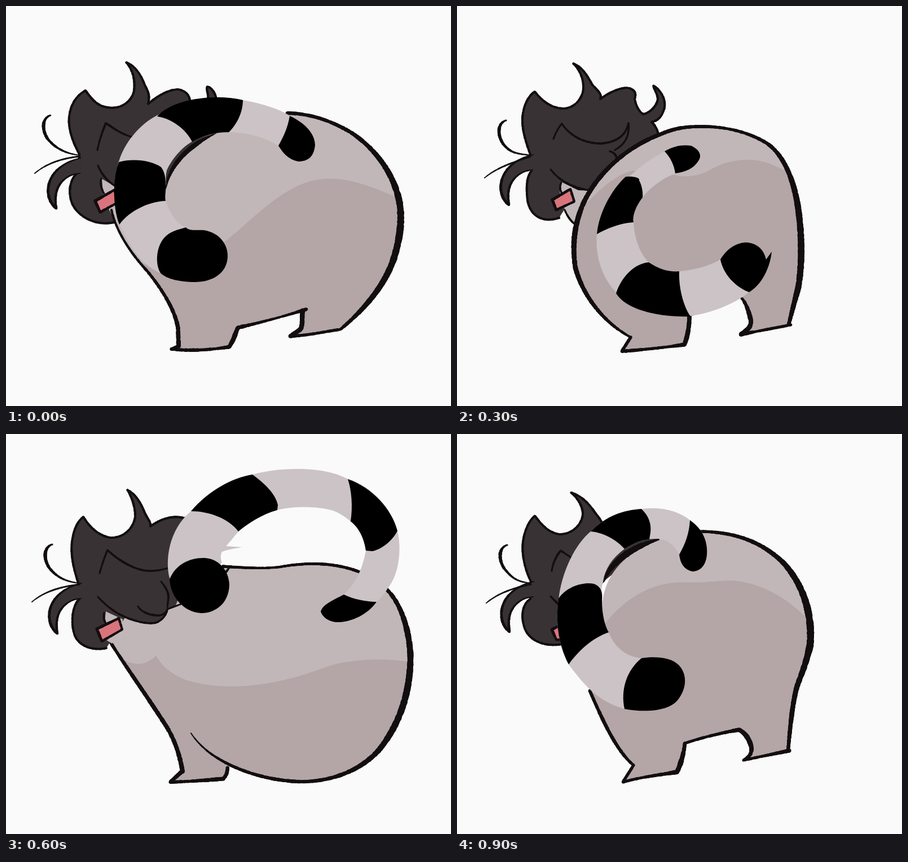
An HTML page with a canvas for the animation above (1 s loop, 789x710 px).

```html
<!DOCTYPE html>
<html lang="en">
<head>
<meta charset="utf-8">
<title>Tail swing</title>
<style>
html, body { margin: 0; width: 100%; height: 100%; overflow: hidden; background: #fafafa; }
canvas { display: block; }
</style>
</head>
<body>
<canvas id="stage" width="789" height="710"></canvas>
<script>
const W = 789, H = 710, STEP = 100;
const INK = '#130f11', HAIR = '#383234', LIGHT = '#c2b7b8', DARK = '#b4a6a6',
      TAIL = '#cbc3c6', PINK = '#d9747c', PAPER = '#fafafa';

// hair: paths ending in Z are filled only. ink: [path, widths along it].
const poses = [
  {
    wisps: [79, 194, 51, 297], lock: [-2, 4],
    hair: [
      'M192,384C160,391 128,375 117,350C108,325 116,303 130,293L130,263C118,240 108,215 113,190C117,170 128,157 141,150C150,162 160,178 181,180C205,184 224,168 227,150C229,132 226,115 213,100C232,108 240,125 246,140C251,150 256,158 252,174C270,158 290,148 305,148C318,150 325,158 326,168',
      'M326,168L375,230L290,330L192,384L130,300L252,174Z',
      'M357,168C361,158 354,150 357,143C367,146 371,156 374,168'
    ],
    skin: 'M170,307L197,322L202,400L182,360L172,332Z',
    tag: 'M158,346L193,326L196,350L167,366Z',
    strands: [
      'M162,256C165,240 170,225 177,208C190,216 205,229 230,234',
      'M163,283C170,300 180,311 197,322',
      'M169,306C166,316 170,326 174,333'
    ],
    body: 'M187,362C195,400 222,440 250,470C277,503 300,540 305,572L306,603L293,609C330,613 365,610 396,605L403,592L411,571C450,562 490,552 530,539C524,552 527,565 522,574L504,586C535,585 565,578 593,574C624,548 668,505 686,450C702,400 702,360 692,330C680,290 650,250 610,224C575,203 540,191 498,190C450,190 400,205 358,230C322,250 297,280 284,323Z',
    shade: 'M230,447C255,470 300,480 388,418C425,390 470,340 520,318C570,297 620,303 720,353V640H230Z',
    ink: [
      ['M187,362C195,400 222,440 250,470C277,503 300,540 305,572L306,604', [4, 4, 5, 6, 8]],
      ['M306,603L293,609C330,613 365,610 396,605L403,592L411,571C450,562 490,552 533,538', [5, 6, 5, 8, 5, 4, 6]],
      ['M526,541C524,552 527,565 522,574L504,586C535,585 565,578 593,574', [8, 8, 5, 5, 5]],
      ['M593,574C624,548 668,505 687,450C703,400 703,360 693,330C681,290 651,250 611,224C575,203 540,191 498,190', [5, 9, 11, 12, 10, 7, 6, 6]],
      ['M283,323C290,285 318,250 372,226', [3, 7, 8, 2]]
    ],
    tail: 'M274,474C240,460 222,430 201,388C190,350 190,300 201,273C210,245 235,210 270,193C310,165 370,158 420,167C455,173 490,185 503,195C530,208 548,228 548,250C546,270 530,277 518,276C500,274 492,262 483,248C455,230 420,224 395,224C375,224 355,228 331,240C305,255 290,280 285,292C283,300 283,310 284,318C282,330 281,340 284,347C290,370 305,388 319,393Z',
    bands: [
      'M268,196C295,165 370,155 420,167C420,190 408,212 395,224C370,224 350,230 330,241C320,220 295,200 268,196Z',
      'M200,277C225,270 258,274 275,286C284,298 282,310 284,320C282,335 282,342 283,346C255,347 220,362 201,388C188,355 190,300 200,277Z',
      'M503,195C535,210 548,230 548,247C546,268 535,276 518,276C500,272 492,262 483,248C492,232 500,215 503,195Z',
      'M319,393C325,400 340,397 352,398C380,403 394,425 393,445C392,475 365,490 335,490C310,490 285,485 274,474C265,460 265,430 280,412C290,400 305,397 319,393Z'
    ]
  },
  {
    front: true, wisps: [82, 196, 46, 298], lock: [0, -1],
    hair: [
      'M178,380C150,386 127,374 121,355C115,335 117,305 130,293L128,264C120,240 113,210 118,185C121,168 127,155 137,147C147,163 162,180 185,184C210,185 228,165 229,145C229,128 222,110 215,99C232,108 240,125 246,140C251,150 258,158 256,164C275,150 298,143 318,150',
      'M318,150L345,200L300,306L286,312C284,326 275,336 262,336L205,325Z'
    ],
    skin: 'M177,315L207,329L205,350L188,372L172,362Z',
    tag: 'M161,346L200,327L206,347L170,368Z',
    strands: [
      'M166,247C170,232 175,218 180,206C200,225 230,243 255,243C268,243 278,241 290,237',
      'M163,289C180,308 200,322 225,330C245,336 262,338 270,333C280,327 285,319 286,311L310,302',
      'M234,306C240,316 255,322 270,322C277,322 282,319 286,312',
      'M275,262C283,272 288,280 288,290L286,308',
      'M174,317C172,328 175,335 180,340',
      'M396,237L388,248'
    ],
    body: 'M183,368C210,410 250,465 285,520C300,545 308,570 313,597L291,618C320,617 350,615 385,612C392,605 392,600 393,589C430,606 475,617 520,617C570,618 625,600 660,560C700,510 716,450 716,390C713,345 700,300 675,276L628,245C580,226 530,228 485,236C460,239 430,238 385,235L200,300Z',
    shade: 'M195,392C225,414 248,412 266,393C275,410 290,425 320,437C370,452 430,452 500,435C540,425 565,413 590,407C640,398 680,398 740,408V650H190Z',
    ink: [
      ['M183,366C210,410 250,465 285,520C300,545 308,570 313,599', [5, 6, 7, 7, 8]],
      ['M313,598L291,618C320,617 350,615 385,612C392,605 392,600 393,592', [7, 6, 5, 6, 7, 6]],
      ['M328,531C335,542 345,553 360,565C400,595 460,615 520,617C572,618 627,600 662,560C702,510 718,450 717,390C714,345 700,300 675,276', [2, 5, 6, 6, 8, 11, 11, 10, 6]],
      ['M385,235C430,238 460,239 485,236C530,228 580,226 630,246', [5, 4, 5, 5]]
    ],
    hole: 'M383,212L392,200L430,160L560,130L640,207L629,244C580,226 530,227 485,234C460,237 430,236 390,232Z',
    tail: 'M290,256C282,225 288,170 328,137C355,105 400,78 437,72C480,60 560,55 606,80C650,92 685,135 694,172C702,205 697,250 676,275C672,283 665,290 657,298C640,322 610,335 585,334C568,332 560,322 558,315C565,300 585,295 599,285C620,265 632,240 638,207C637,180 615,150 580,136C550,128 510,128 481,135C455,142 430,158 413,172C402,185 396,193 390,199L419,201C405,203 390,206 383,209C380,215 380,220 383,228L350,260Z',
    bands: [
      'M328,137C360,100 400,78 437,72C455,85 478,105 482,126L481,135C455,142 430,158 412,173C395,150 360,137 328,137Z',
      'M606,80C650,95 685,135 694,172C685,190 665,205 650,208L638,207C635,185 625,165 611,155C615,130 613,100 606,80Z',
      'M599,285C615,293 640,298 657,298C640,322 610,335 585,334C568,332 560,322 558,315C562,302 580,295 599,285Z',
      'M290,258C300,232 325,220 350,220C375,220 395,240 396,268C395,300 372,318 346,318C315,316 292,290 290,258Z'
    ]
  },
  {
    front: true, wisps: [83, 198, 46, 302], lock: [2, 0],
    hair: [
      'M175,379C147,382 123,365 119,340C116,320 120,302 131,292L130,264C118,235 110,210 114,185C118,168 126,153 135,150C142,150 147,158 152,165C160,178 175,188 192,188C215,184 231,165 230,145C227,125 222,112 213,100C232,108 245,125 250,142C257,155 262,158 261,164C275,156 292,148 305,149C315,150 315,160 316,165',
      'M316,165C320,180 325,192 331,197C345,190 356,180 357,165C356,155 350,148 347,141C362,148 370,160 370,178C370,195 362,205 352,208C366,220 366,235 363,243C360,250 352,252 352,254C368,258 385,252 394,237C393,255 380,267 365,269C350,270 340,268 330,263C335,275 343,290 337,302C336,290 330,280 327,275C323,290 310,300 300,305C292,308 288,310 285,312C284,325 278,335 262,334C240,334 222,332 205,324'
    ],
    skin: 'M173,306L210,327L222,352L205,374L188,364L176,340Z',
    tag: 'M163,348L196,326L206,345L168,367Z',
    strands: [
      'M169,244C172,232 178,218 184,207C205,232 235,248 262,247C285,245 300,235 304,212C307,230 300,242 285,250',
      'M159,288C175,308 200,325 235,331C255,334 270,334 276,328',
      'M236,308C245,318 258,326 275,327',
      'M273,262C283,268 288,278 287,288C294,295 292,303 286,310',
      'M173,308C170,322 175,332 179,340',
      'M187,366L204,376'
    ],
    extra: 'M603,497L585,573L512,587L540,560Z',
    body: 'M244,348C205,375 168,425 164,480C163,530 190,570 245,598C290,615 350,618 400,613C460,605 530,580 572,535C600,500 615,470 620,430C622,395 612,365 580,325C545,285 480,250 430,238C400,231 375,230 364,231L300,260L200,320L195,365L215,372Z',
    shade: 'M178,415C205,455 245,475 300,485C330,490 360,490 390,483L535,434C565,415 585,390 607,356L640,420V640H150Z',
    ink: [
      ['M244,348C205,375 168,425 164,480C163,530 190,570 245,598C290,615 350,618 400,613C460,605 530,580 572,535C584,522 592,511 599,498', [3, 6, 9, 10, 7, 6, 6, 6, 8, 8, 5]],
      ['M364,231C375,230 400,231 430,238C480,250 545,285 580,325C603,352 616,372 620,392', [6, 5, 5, 5, 6, 8]],
      ['M603,498L585,573', [5, 7, 9]],
      ['M584,573C560,580 540,584 512,587', [8, 6, 6]],
      ['M291,617L325,613', [7, 3]]
    ],
    tail: 'M395,420C375,414 356,420 353,438C354,455 370,472 390,482C420,497 445,503 470,507C505,512 540,510 569,504C610,497 645,478 669,450C700,415 714,380 714,337C713,300 702,265 688,241L599,279C620,300 638,325 638,353C635,372 620,395 605,406C585,420 560,432 537,436C515,438 485,438 465,435C440,432 415,427 395,420Z',
    bands: [
      'M395,420C375,414 356,420 353,438C354,455 370,472 390,482C388,465 390,440 395,420Z',
      'M465,435C485,438 515,438 537,436C540,465 555,490 569,504C540,510 505,512 470,508C458,485 457,458 465,435Z',
      'M638,353C665,354 695,347 714,338C714,380 700,415 669,450C640,448 612,430 605,406C620,395 635,372 638,353Z',
      'M599,279C630,282 670,270 688,241C675,218 660,205 645,204L632,206C625,193 595,190 585,208C585,216 570,225 571,243C573,258 588,268 599,279Z'
    ]
  },
  {
    wisps: [87, 203, 49, 305], lock: [1, -2],
    hair: [
      'M181,376C155,385 130,375 125,345C122,320 124,302 132,293L130,264C120,235 112,210 118,185C122,168 130,157 138,152C148,165 165,182 190,182C212,180 224,160 224,145C224,125 215,110 206,102C222,108 232,125 240,140C250,150 258,158 254,165C275,150 295,143 306,146C316,150 318,155 315,165',
      'M315,165C318,180 325,190 331,192C345,188 355,175 356,165C355,155 349,147 348,141C362,150 370,165 368,180C364,195 358,203 345,206C352,212 357,222 358,235L240,328C225,329 213,326 205,322'
    ],
    skin: 'M184,312L215,327L240,328L213,392L194,372L182,330Z',
    tag: 'M169,344L201,325L208,347L176,362Z',
    strands: [
      'M171,236C175,225 180,215 186,209C200,230 225,244 255,244C285,242 300,228 304,208C306,228 300,245 279,256',
      'M166,290C180,308 200,322 240,328',
      'M271,258C280,260 284,268 284,275',
      'M185,313C181,321 183,328 186,332',
      'M191,362C196,374 203,384 213,390'
    ],
    body: 'M430,214C470,213 515,222 550,244C580,265 597,310 604,360C611,410 611,460 604,500C597,530 592,550 588,566C565,572 535,578 503,583C515,575 522,570 521,558C518,545 513,528 505,518L412,552C412,570 408,590 403,602C370,606 330,610 292,613L308,588C265,565 225,520 210,465C203,420 210,385 222,355C245,300 300,250 360,228C385,217 405,214 430,214Z',
    shade: 'M200,385C240,335 280,298 312,292L387,300C400,305 430,303 450,290C470,278 495,272 520,273C545,274 560,280 620,312V640H200Z',
    ink: [
      ['M308,588C265,565 225,520 210,465C203,420 210,385 222,355C245,300 300,250 360,228C385,217 405,214 430,214C470,213 515,222 550,244', [4, 6, 8, 9, 8, 7, 7, 6, 5, 6]],
      ['M550,244C580,265 598,310 605,360C612,410 612,460 605,500C597,530 592,550 588,566', [6, 8, 10, 11, 11, 10, 6]],
      ['M592,566C565,571 535,577 503,583C515,575 522,570 521,558C518,545 513,528 505,519', [5, 5, 5, 8, 8, 5]],
      ['M308,588L292,613C330,610 370,606 403,601C408,590 412,570 412,551', [5, 6, 5, 5, 8, 7]]
    ],
    tail: 'M368,258C385,248 400,246 415,248C430,255 432,265 427,275C420,288 405,295 387,297C360,308 340,325 329,340C315,360 311,375 313,384C315,415 325,440 340,455C360,468 375,472 394,471C425,468 450,460 467,450L518,508C490,530 450,545 415,550C360,553 300,540 282,508C255,480 245,440 248,405C253,365 275,325 305,303C325,285 345,270 368,258Z',
    bands: [
      'M368,258C385,248 400,246 415,248C430,255 435,265 428,275C420,288 405,295 387,297C385,282 378,268 368,258Z',
      'M299,303C312,302 325,304 323,310C328,318 330,332 329,340C315,358 311,375 313,384C290,385 265,395 248,405C252,365 275,325 299,303Z',
      'M340,455C360,468 375,472 394,471C393,498 400,530 414,551C360,553 300,540 282,510C292,480 315,457 340,455Z',
      'M467,450C480,428 500,418 517,420C535,423 545,435 548,450L558,436C555,465 540,495 518,508C492,498 472,475 467,450Z'
    ]
  },
  {
    wisps: [89, 197, 52, 300], lock: [2, -4],
    hair: [
      'M186,373C160,378 130,370 120,345C113,325 115,302 130,293L132,264C120,240 113,210 118,185C122,165 130,152 138,145C148,158 160,175 182,178C205,178 222,160 223,142C223,128 213,112 202,104C222,110 235,125 245,140C255,152 260,160 258,170',
      'M258,170L355,186L262,260L186,373L130,300Z'
    ],
    skin: '',
    tag: 'M168,347L186,338L188,366L176,365Z',
    strands: [
      'M168,243C170,228 177,215 184,207L202,219',
      'M166,288C172,295 178,300 184,306'
    ],
    body: 'M430,173C490,173 540,190 580,230C618,275 628,330 624,375C615,420 605,435 600,455C592,490 590,530 587,562L508,579C518,573 523,568 522,556C518,540 510,530 500,525C470,530 430,540 404,549C402,570 395,590 390,600C360,605 325,609 294,618L313,588C280,560 255,500 235,455L258,300C262,255 290,215 355,187Z',
    shade: 'M225,400C265,310 330,263 400,263C440,265 460,260 490,260C540,265 595,292 640,350V640H225Z',
    ink: [
      ['M428,173C490,173 540,190 580,230C620,275 630,330 626,375C616,420 606,435 601,455C593,490 590,530 587,562', [5, 6, 7, 10, 12, 12, 9, 8, 6]],
      ['M589,562L508,579C518,573 523,568 522,556C518,540 510,530 500,525C470,530 430,540 404,549', [7, 5, 5, 9, 6, 5, 5]],
      ['M404,549C402,570 395,590 390,600C360,605 325,609 294,618L313,588', [6, 9, 6, 5, 5, 5]],
      ['M313,588C280,560 255,500 235,455', [5, 6, 6, 5]],
      ['M260,262C272,228 310,200 358,187', [3, 9, 11, 9, 3]]
    ],
    tail: 'M297,488C250,475 225,445 198,409C178,370 175,330 180,295C185,245 210,195 237,173C265,145 295,135 327,133C365,128 395,138 413,153C435,168 445,190 443,215C441,235 430,244 417,244C402,240 396,230 394,214C385,195 370,186 355,186C335,186 315,190 297,204C275,220 262,240 259,262C255,275 256,285 258,295C257,320 262,340 269,352C280,380 300,395 327,398Z',
    bands: [
      'M413,153C435,168 445,190 443,215C441,235 430,244 417,244C402,240 396,230 394,214C405,195 412,175 413,153Z',
      'M237,173C265,145 295,135 327,133C340,145 345,160 343,175L341,187C325,188 310,195 297,204C285,190 262,175 237,173Z',
      'M180,292C195,270 225,262 243,266C258,272 258,285 257,295C257,320 262,340 269,352C240,362 215,385 198,409C178,370 175,330 180,292Z',
      'M327,398C350,394 380,396 393,410C408,425 408,450 393,470C378,492 335,495 297,488C290,455 300,420 327,398Z'
    ]
  }
];

const LOCK = 'M134,266C100,274 80,294 77,318C75,335 82,348 91,355C88,335 90,318 104,305C113,297 121,294 134,293';
const probe = document.createElementNS('http://www.w3.org/2000/svg', 'path');
let g, seed = 7;

function rnd() {
  seed = (seed * 16807) % 2147483647;
  return seed / 2147483647;
}

function fill(d, color) {
  if (!d) return;
  g.fillStyle = color;
  g.fill(new Path2D(d));
}

// Dabs along the path; the width follows the list, with a slightly rough rim.
function brush(d, widths) {
  probe.setAttribute('d', d);
  const len = probe.getTotalLength(), last = widths.length - 1;
  g.fillStyle = INK;
  for (let s = 0; s <= len; s += 1.2) {
    const p = probe.getPointAtLength(s), k = s / len * last, i = Math.min(last - 1, Math.floor(k));
    const w = widths[i] + (widths[i + 1] - widths[i]) * (k - i);
    const r = w / 2 + (rnd() - 0.5) * w * 0.12;
    g.beginPath();
    g.arc(p.x, p.y, r, 0, Math.PI * 2);
    g.fill();
  }
}

function drawHead(p) {
  const [x, y, u, v] = p.wisps;
  p.hair.forEach(d => fill(d, HAIR));
  p.hair.filter(d => !d.endsWith('Z')).forEach(d => brush(d, [4, 4]));
  g.save();
  g.translate(...p.lock);
  fill(LOCK, HAIR);
  brush(LOCK, [2, 4, 5, 4, 2]);
  g.restore();
  brush(`M${x},${y}C${x - 14},${y + 4} ${x - 17},${y + 24} ${x - 5},${y + 42}C${x + 8},${y + 58} 105,262 131,265`, [3, 6, 5, 4, 3, 2]);
  brush(`M${u},${v}C${u + 20},${v - 17} ${u + 48},${v - 27} 131,267`, [2, 3, 3]);
  fill(p.skin, LIGHT);
  p.strands.forEach(d => brush(d, [3, 4, 3]));
  fill(p.tag, PINK);
  brush(p.tag, [5, 4, 5]);
}

function drawBody(p) {
  if (p.extra) fill(p.extra, DARK);
  fill(p.body, LIGHT);
  g.save();
  g.clip(new Path2D(p.body));
  fill(p.shade, DARK);
  g.restore();
  p.ink.forEach(([d, w]) => brush(d, w));
}

function drawTail(p) {
  fill(p.tail, TAIL);
  p.bands.forEach(d => fill(d, '#000'));
}

function render(p) {
  const c = document.createElement('canvas');
  c.width = W;
  c.height = H;
  g = c.getContext('2d');
  fill(`M0,0H${W}V${H}H0Z`, PAPER);
  const parts = p.front ? [drawBody, drawHead] : [drawHead, drawBody];
  parts.forEach(f => f(p));
  fill(p.hole, PAPER);
  if (p.hole) brush(...p.ink[3]);
  drawTail(p);
  return c;
}

const cels = poses.map(render);
const stage = document.getElementById('stage').getContext('2d');
const start = performance.now();

function tick() {
  const t = Math.max(0, performance.now() - start);
  stage.drawImage(cels[Math.floor(t / STEP) % cels.length], 0, 0);
  requestAnimationFrame(tick);
}
tick();
</script>
</body>
</html>
```
